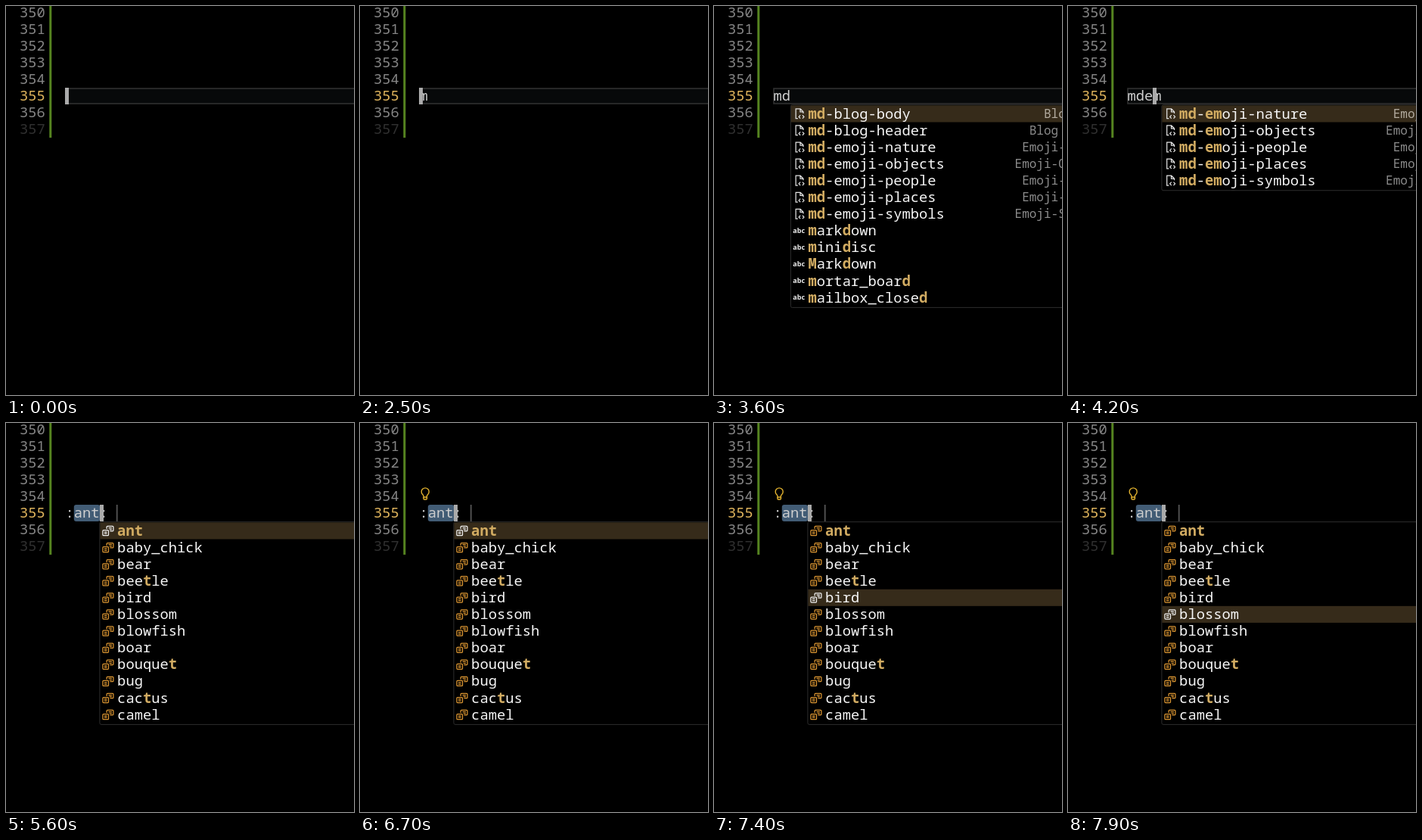
Write an HTML page that moves like this. It is 460x514 px and loops after 8000 ms.

```html
<!DOCTYPE html>
<html lang="en">
<head>
<meta charset="utf-8">
<title>Snippet completion</title>
<style>
  html, body { margin: 0; width: 100%; height: 100%; overflow: hidden; background: #000; }
  svg { display: block; width: 460px; height: 514px; }
  text { font: 18.8px "Noto Sans Mono", "DejaVu Sans Mono", monospace; white-space: pre; }
  .num { fill: #858585; }
  .num.on { fill: #dfb45c; }
  .num.dim { fill: #303030; }
  .code { fill: #cfcfcf; }
  .item { fill: #f6f6f6; font-weight: 500; }
  .hit { fill: #d2ac62; font-weight: 600; }
  .note { font-size: 16px; fill: #8c8c8c; text-anchor: end; }
  .sel .note { fill: #b4aca0; }
  .abc { font: 700 9px "Open Sans", "Noto Sans", sans-serif; fill: #eee; }
  .icon { fill: none; stroke: #e2e2e2; stroke-width: 1.25; }
  .enum { stroke: #dc9632; }
  .sel .enum { stroke: #f2f2f2; }
  .bar { fill: none; }
  .sel .bar { fill: #362b1a; }
</style>
</head>
<body>
<svg viewBox="0 0 460 514">
  <rect width="460" height="514" fill="#000"/>
  <g id="nums"></g>
  <rect x="57.3" y="0" width="3" height="174" fill="#568420"/>
  <rect id="line" x="79" y="109" width="400" height="20" fill="#07090a" stroke="#303030" stroke-width="1.6"/>
  <g id="snip">
    <rect x="89.8" y="108" width="34.5" height="22" rx="3" fill="#425c75"/>
    <rect x="145.8" y="108" width="1.8" height="22" fill="#555"/>
  </g>
  <text id="code" class="code" x="78.4" y="125.3"></text>
  <rect id="caret" y="108" width="5" height="22" fill="#aaa"/>
  <g id="bulb" fill="none" stroke="#e3b32f" stroke-width="1.4">
    <path d="M84 98v-1.3q0-1.2-1.4-2.4a5 5 0 1 1 7.2 0q-1.4 1.2-1.4 2.4v1.3z"/>
    <path d="M84 98v2q0 1 1 1h2.4q1 0 1-1v-2"/>
  </g>
  <g id="menu"></g>
</svg>
<script>
const LOOP = 8000, COL = 11.28, LEFT = 78.8, ROW = 22.09, TOP = 131.4;
const $ = id => document.getElementById(id);

const page = '<path class="icon" d="M9.5 6.2H6.8V-6.6H12.8L16.6-2.8V-.5M12.6-6.4V-2.6H16.4' +
  'M12.8 1.8L10.8 4L12.8 6.2M15.6 1.8L17.6 4L15.6 6.2"/>';
const boxes = '<path class="icon enum" d="M5-.8h5.6q1 0 1 1v5q0 1-1 1H5q-1 0-1-1v-5q0-1 1-1z' +
  'M6 1.6h3.6M6 3.8h3.6M9.2-2.4V-5q0-1 1-1H17q1 0 1 1V-.6q0 1-1 1H13.6M11.6-3.8h4.4M12.8-1.6h3.2"/>';
const abc = '<text class="abc" x="3" y="3">abc</text>';

const cap = s => s[0].toUpperCase() + s.slice(1);
const md = (group, name) => ({ icon: page, label: `md-${group}-${name}`, group, name });
const word = label => ({ icon: abc, label });
const blog = ['body', 'header'].map(n => md('blog', n));
const emoji = ['nature', 'objects', 'people', 'places', 'symbols'].map(n => md('emoji', n));
const words = s => s.split(' ').map(word);

const all = [...blog, ...emoji, ...words('markdown minidisc Markdown mortar_board mailbox_closed')];
const some = [...emoji, blog[1], ...words('male_detective model modern middle mode')];
const animals = 'ant baby_chick bear beetle bird blossom blowfish boar bouquet bug cactus camel'
  .split(' ').map(label => ({ icon: boxes, label, query: label === 'ant' ? 'ant' : 't' }));

// Each step changes part of the state and keeps the rest.
const steps = [
  [0, { text: '', caret: 0, list: null, query: '', pick: 0, snip: false, bulb: false }],
  [2500, { text: 'm' }],
  [2600, { caret: 1, list: all, query: 'm' }],
  [3200, { text: 'md' }],
  [3300, { caret: 2, query: 'md' }],
  [3500, { caret: -1 }],
  [3700, { text: 'mde', list: some, query: 'mde', caret: 2 }],
  [3800, { caret: 3 }],
  [4200, { text: 'mdem', list: emoji, query: 'mdem' }],
  [4300, { caret: 4 }],
  [4800, { text: 'mdemn', list: emoji.slice(0, 1), query: 'mdemn' }],
  [4900, { caret: 5 }],
  [5500, { text: ':ant:', caret: 4, list: animals, snip: true }],
  [5800, { bulb: true }],
  [6900, { pick: 1 }],
  [7000, { pick: 2 }],
  [7200, { pick: 3 }],
  [7400, { pick: 4 }],
  [7600, { pick: 5 }]
];
const states = [];
steps.reduce((prev, [, patch]) => {
  const next = { ...prev, ...patch };
  states.push(next);
  return next;
}, {});

// Highlights the letters of the query in the order they occur.
function mark(label, query) {
  let i = 0;
  return [...label].map(c => {
    const hit = i < query.length && c.toLowerCase() === query[i];
    if (hit) i++;
    return hit ? `<tspan class="hit">${c}</tspan>` : c;
  }).join('');
}

function row(item, i, s) {
  const note = item.group
    ? `<text class="note" x="421" y="5.4">${cap(item.group)}${item.group === 'blog' ? ' ' : '-'}${cap(item.name)}</text>` : '';
  return `<g class="${i === s.pick ? 'sel' : ''}" transform="translate(0 ${ROW * (i + 0.5)})">
    <rect class="bar" x=".5" y="${-ROW / 2}" width="460" height="${ROW}"/>${item.icon}
    <text class="item" x="23.2" y="6.2">${mark(item.label, item.query || s.query)}</text>${note}</g>`;
}

function menu(s) {
  if (!s.list) return '';
  const col = s.snip ? 4 : s.text.length;
  return `<g transform="translate(${LEFT + COL * col} ${TOP})">
    <rect x="0" y="-.7" width="470" height="${ROW * s.list.length + 2.6}" rx="2" fill="#000" stroke="#2e2e2e"/>
    ${s.list.map((item, i) => row(item, i, s)).join('')}</g>`;
}

const show = (id, on) => $(id).setAttribute('visibility', on ? 'visible' : 'hidden');

function draw(s) {
  $('code').textContent = s.text;
  $('caret').setAttribute('x', Math.round(LEFT - 0.4 + COL * s.caret));
  show('caret', s.caret >= 0);
  show('line', !s.snip);
  show('snip', s.snip);
  show('bulb', s.bulb);
  $('menu').innerHTML = menu(s);
}

for (let n = 350; n < 358; n++) {
  const kind = n === 355 ? 'on' : n === 357 ? 'dim' : '';
  $('nums').innerHTML += `<text class="num ${kind}" x="18" y="${15.2 + 22.04 * (n - 350)}">${n}</text>`;
}

const start = performance.now();
let shown = -1;
function tick() {
  const t = (performance.now() - start) % LOOP;
  let now = 0;
  while (now + 1 < steps.length && steps[now + 1][0] <= t) now++;
  if (now !== shown) draw(states[shown = now]);
  requestAnimationFrame(tick);
}
tick();
</script>
</body>
</html>
```
